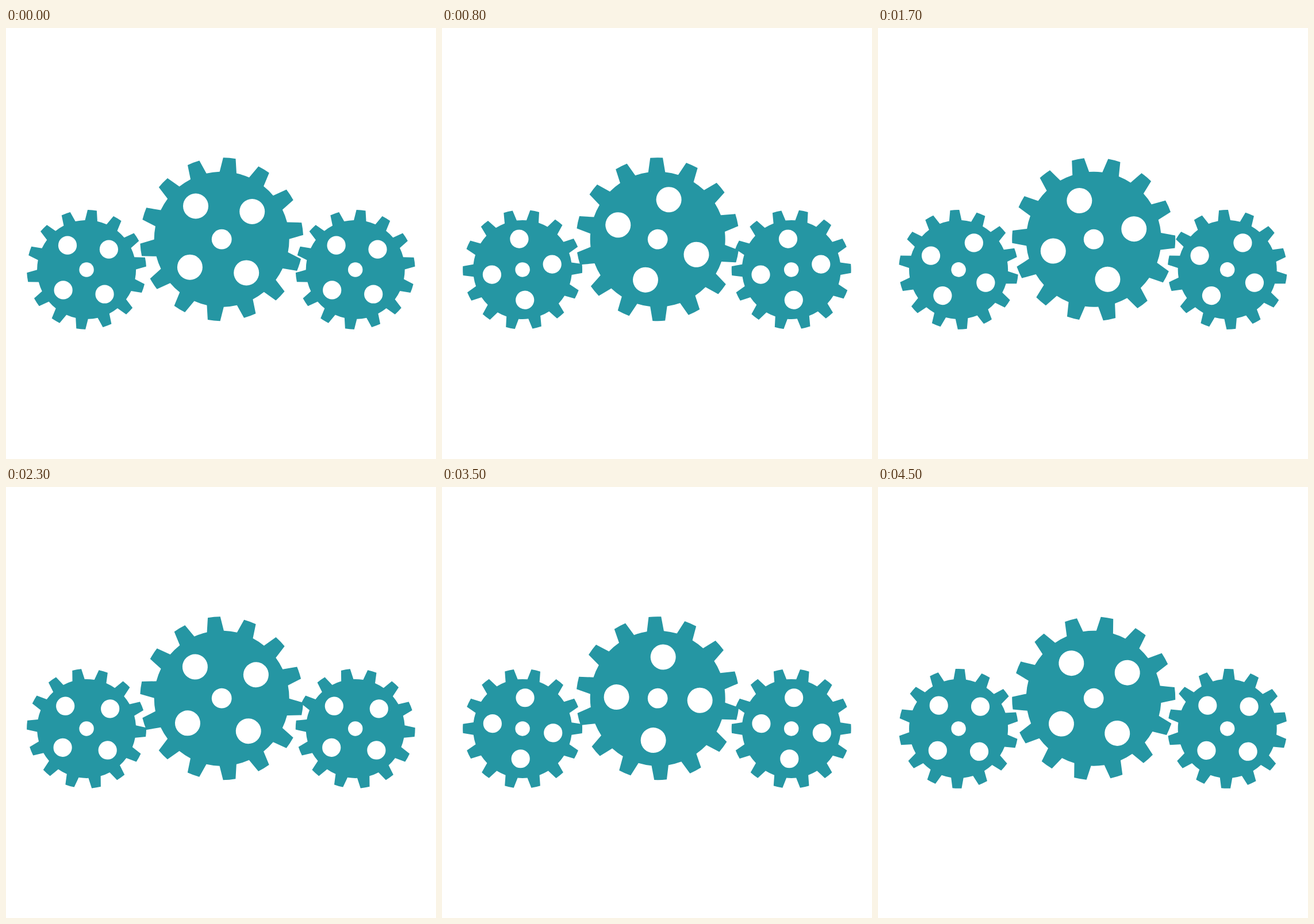
Write an HTML page that moves like this. It is 748 px wide and 749 px high and loops after 4.6 s.

```html
<!DOCTYPE html>
<html lang="en">
<head>
<meta charset="utf-8">
<title>Gears</title>
<style>
  html, body { margin: 0; width: 100%; height: 100%; overflow: hidden; background: #fff; }
  svg { display: block; width: 100%; height: 100%; }
</style>
</head>
<body>
<svg viewBox="0 0 748 749">
  <defs>
    <g id="gear">
      <path id="rim" fill="#2596a3"/>
      <g fill="#fff">
        <circle r="17.4"/>
        <circle cx="-45.2" cy="-57.7" r="22"/>
        <circle cx="53" cy="-48.2" r="22"/>
        <circle cx="43" cy="58.2" r="22"/>
        <circle cx="-55.3" cy="48.5" r="22"/>
      </g>
    </g>
  </defs>
  <use href="#gear" data-x="140.1" data-y="419.9" data-size="0.732" data-dir="1"/>
  <use href="#gear" data-x="607.7" data-y="419.9" data-size="0.732" data-dir="1"/>
  <use href="#gear" data-x="375.2" data-y="367.2" data-size="1" data-dir="-1"/>
</svg>
<script>
const TEETH = 14, ROOT = 117.5, TIP = 142, PHASE = -7.4;
const STEP = 100, FRAMES = 46;

const polar = (r, deg) => {
  const a = deg * Math.PI / 180;
  return `${(r * Math.cos(a)).toFixed(2)} ${(r * Math.sin(a)).toFixed(2)}`;
};
const arc = (r, deg) => `A${r} ${r} 0 0 1 ${polar(r, deg)}`;

function rimPath() {
  let d = '';
  for (let i = 0; i < TEETH; i++) {
    const mid = PHASE + i * 360 / TEETH;
    d += (i ? arc(ROOT, mid - 7.2) : 'M' + polar(ROOT, mid - 7.2))
      + 'L' + polar(TIP, mid - 4.4) + arc(TIP, mid + 4.4) + 'L' + polar(ROOT, mid + 7.2);
  }
  return d + arc(ROOT, PHASE - 7.2) + 'Z';
}

// Four degrees per step, slowing slightly around the middle of the loop.
function angleAt(n) {
  if (n <= 17) return 4 * n;
  if (n < 23) return 68 + (n - 17) * 20 / 6;
  return 4 * (n - 1);
}

document.getElementById('rim').setAttribute('d', rimPath());
const gears = document.querySelectorAll('use');

function draw() {
  const angle = angleAt(Math.floor(performance.now() / STEP) % FRAMES);
  for (const gear of gears) {
    const { x, y, size, dir } = gear.dataset;
    gear.setAttribute('transform', `translate(${x} ${y}) scale(${size}) rotate(${dir * angle})`);
  }
  requestAnimationFrame(draw);
}
draw();
</script>
</body>
</html>
```
